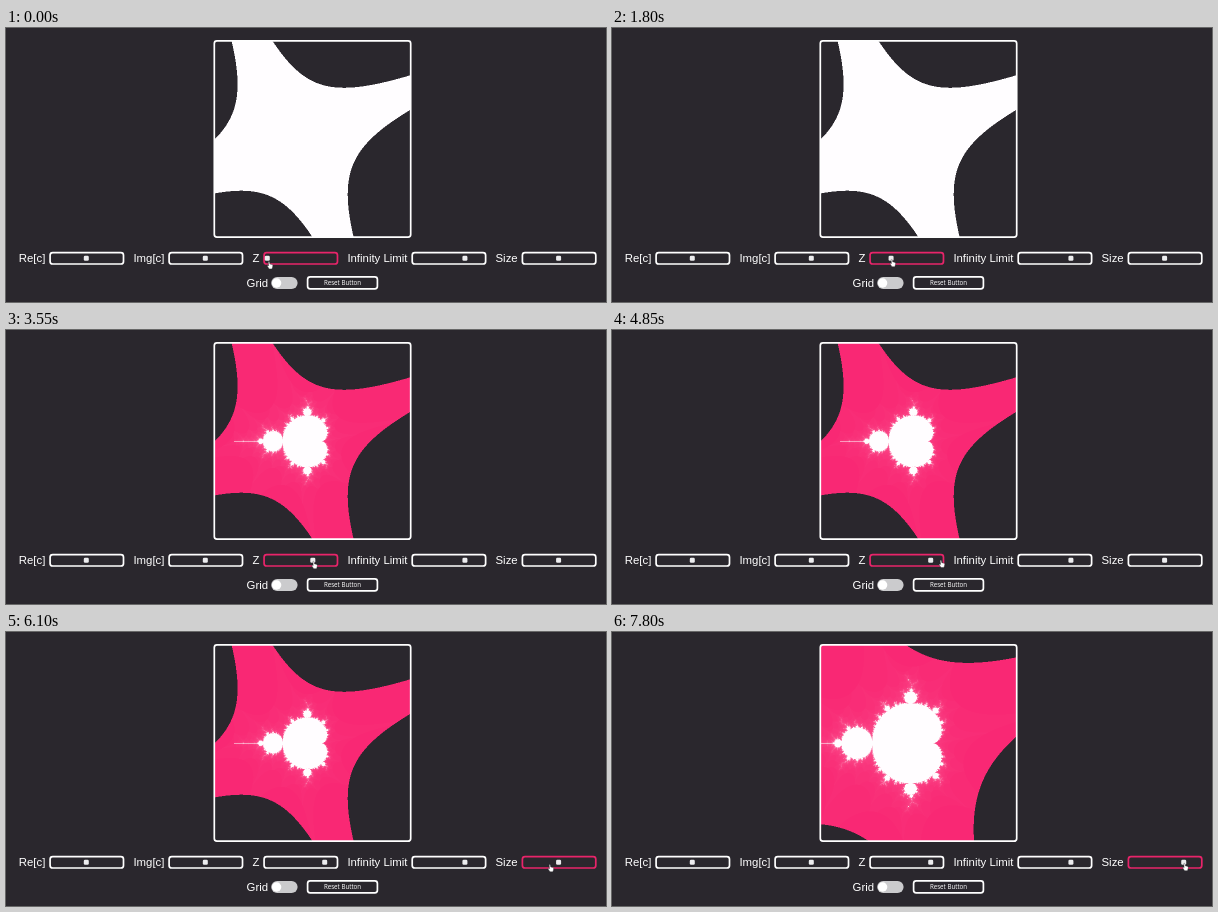
Recreate the animation shown at these times as an HTML page with a canvas. Size 600 by 274 pixels, loop 8 s.

```html
<!DOCTYPE html>
<html lang="en">
<head>
<meta charset="utf-8">
<title>Fractal explorer</title>
<style>
  html, body { margin: 0; width: 100%; height: 100%; overflow: hidden; background: #2a272d; }
  #stage { position: relative; width: 600px; height: 274px; overflow: hidden; }
  canvas { position: absolute; left: 207.8px; top: 13px; width: 196px; height: 196px; }
  svg { position: absolute; left: 0; top: 0; }
  text { fill: #fff; font: 11.4px "Liberation Sans", Arial, sans-serif; }
  .small { font: 500 6.2px "Open Sans", sans-serif; }
  .box { fill: none; stroke: #fff; stroke-width: 1.7; }
  .box.hover { stroke: #e8246a; }
  .thumb { fill: #ececee; }
</style>
</head>
<body>
<div id="stage">
  <canvas id="plot" width="392" height="392"></canvas>
  <svg id="ui" width="600" height="274" viewBox="0 0 600 274">
    <rect class="box" x="208.3" y="12.9" width="196.4" height="196.3" rx="2.6"/>
    <text x="240.6" y="258.8">Grid</text>
    <rect x="265.2" y="249" width="26.4" height="12" rx="6" fill="#cbcbcd"/>
    <circle cx="270.6" cy="255" r="4.7" fill="#fff"/>
    <rect class="box" x="301.6" y="248.9" width="69.8" height="12" rx="2.6"/>
    <text class="small" x="336.5" y="257.2" text-anchor="middle">Reset Button</text>
  </svg>
</div>
<script>
const LOOP = 8000, STEP = 50;
const BOX = 73.4, TRAVEL = 66, LABEL_GAP = 4.7, GAP = 9.9;
const PINK = [249, 38, 114], DARK = [42, 39, 45], WHITE = [255, 253, 255];

const ui = document.getElementById('ui');
const plot = document.getElementById('plot');
const ctx = plot.getContext('2d');

const lerp = (a, b, u) => a + (b - a) * u;
const ramp = (t, from, to) => Math.min(1, Math.max(0, (t - from) / (to - from)));
const smooth = u => u * u * (3 - 2 * u);

function add(tag, attrs, text = '') {
  const el = document.createElementNS('http://www.w3.org/2000/svg', tag);
  for (const key in attrs) el.setAttribute(key, attrs[key]);
  el.textContent = text;
  return ui.appendChild(el);
}

// Lay the sliders out in one row, each after its label
let nextX = 12.8;
function slider(label, value) {
  const text = add('text', { x: nextX, y: 233.7 }, label);
  const x = nextX + text.getComputedTextLength() + LABEL_GAP;
  const box = add('rect', { class: 'box', x, y: 224.6, width: BOX, height: 11.4, rx: 2.6 });
  const thumb = add('rect', { class: 'thumb', y: 227.7, width: 5, height: 5, rx: 1.3 });
  nextX = x + BOX + GAP;
  return {
    set(v) {
      const center = x + 3.2 + v * TRAVEL;
      thumb.setAttribute('x', center - 2.5);
      return center;
    },
    hover(px) { box.classList.toggle('hover', px > x - 1 && px < x + BOX + 1); },
    value
  };
}

const sliders = [
  slider('Re[c]', 0.5), slider('Img[c]', 0.5), slider('Z', 0),
  slider('Infinity Limit', 0.75), slider('Size', 0.5)
];
const [, , zSlider, limitSlider, sizeSlider] = sliders;
for (const s of sliders) s.set(s.value);

const hand = add('path', {
  d: 'M-1.9-3.4Q-1.2-4.1-.6-3.3L-.3-1.3 2-.7Q2.8-.4 2.7.5L2.3 2.2 1.8 3.6H-1L-2.8 1Q-3.1 0-2.2.1L-1.5.5Z',
  fill: '#fff', stroke: '#2a272d', 'stroke-width': .4
});

// Slider values over time: three drags of Z, one of Size
const zValue = t =>
  0.49 * ramp(t, 650, 2200) ** 2 + 0.2 * ramp(t, 3000, 3250) + 0.18 * ramp(t, 3900, 4250);
const sizeValue = t => sizeSlider.value + 0.29 * ramp(t, 6850, 7400);

const LIMIT = limitSlider.value * 5 - 0.05;

function escapeCount(x, y, max) {
  let a = x, b = y, n = 0;
  while (n < max) {
    const re = a * a - b * b + x;
    b = 2 * a * b + y;
    a = re;
    if (Math.abs(a + b) > LIMIT) break;
    n++;
  }
  return n;
}

function fractal(max, range) {
  const size = plot.width, img = ctx.createImageData(size, size);
  const coord = i => (2 * i / size - 1) * range;
  for (let j = 0, p = 0; j < size; j++) {
    for (let i = 0; i < size; i++, p += 4) {
      const n = escapeCount(coord(i), coord(j), max);
      for (let c = 0; c < 3; c++) {
        img.data[p + c] = n ? lerp(PINK[c], WHITE[c], n / max) : DARK[c];
      }
      img.data[p + 3] = 255;
    }
  }
  return img;
}

// The picture is redrawn only some time after a drag ends
const views = [0, 2550, 3550, 4400, 7650].map(start => ({
  start,
  img: fractal(Math.round(1 + 99 * zValue(start)), 4.05 - 3.1 * sizeValue(start))
}));
let shown = null;

function draw(t) {
  const view = views.filter(v => v.start <= t).pop();
  if (view !== shown) ctx.putImageData((shown = view).img, 0, 0);

  const zX = zSlider.set(zValue(t)), sizeX = sizeSlider.set(sizeValue(t));

  // The hand holds the Z thumb, then glides over to the Size thumb
  const settle = 1 - ramp(t, 0, 200), glide = ramp(t, 4650, 6300);
  const x = lerp(zX, sizeX, smooth(glide)) + 1.9 + settle;
  const y = 235.1 + 2.2 * settle - 1.7 * Math.sin(2 * Math.PI * glide);
  hand.setAttribute('transform', `translate(${x} ${y})`);
  for (const s of sliders) s.hover(x - 1.3);
}

const begin = performance.now();
function tick() {
  const t = (performance.now() - begin) % LOOP;
  draw(Math.floor(t / STEP) * STEP);
  requestAnimationFrame(tick);
}
tick();
</script>
</body>
</html>
```
